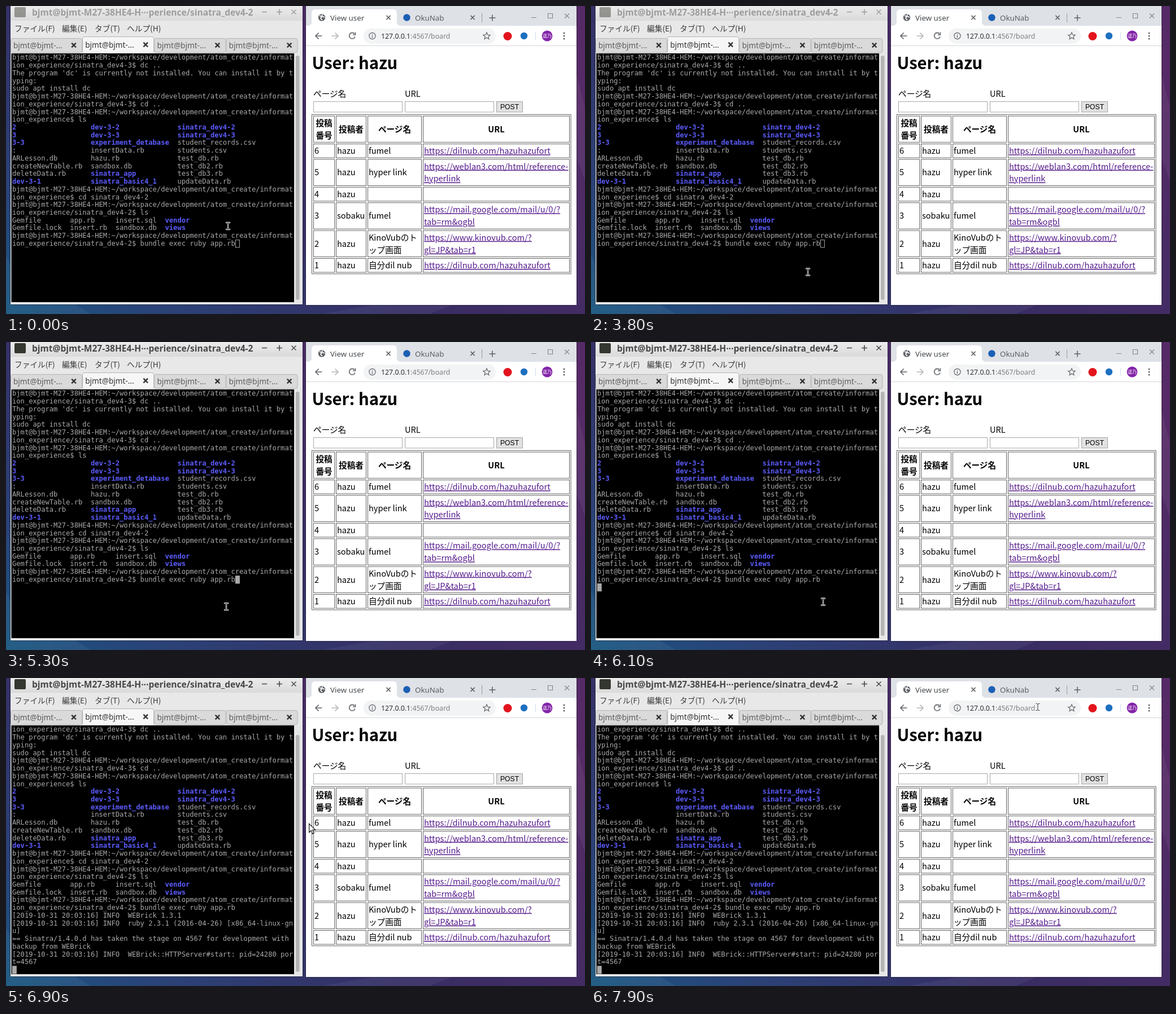
These frames come from a looping animation (1025 by 546 pixels, 8 s). An HTML page:

```html
<!DOCTYPE html>
<html lang="ja">
<head>
<meta charset="utf-8">
<title>Terminal and browser</title>
<style>
html, body { margin: 0; width: 100%; height: 100%; overflow: hidden; background: #343163; }
svg { display: block; width: 1025px; height: 546px; }
text { white-space: pre; }
.ui { font-family: "Noto Sans", "Open Sans", sans-serif; }
.ja { font-family: "Noto Sans CJK JP", "Noto Sans CJK", sans-serif; }
.page { font-size: 14.63px; }
.mono { font: 12.15px "DejaVu Sans Mono", monospace; fill: #aaa; }
.dir { font-weight: bold; fill: #5c5cff; }
.bold { font-weight: bold; }
.mid { text-anchor: middle; }
.link { fill: #551a8b; text-decoration: underline; }
.line { fill: none; stroke-width: 1.6; }
</style>
</head>
<body>
<svg id="stage" viewBox="0 0 1025 546">
  <defs>
    <linearGradient id="wall" x1="0" y1="1" x2="1" y2=".35">
      <stop offset="0" stop-color="#17567f"/><stop offset=".18" stop-color="#2a4378"/>
      <stop offset=".5" stop-color="#372d63"/><stop offset="1" stop-color="#552a66"/>
    </linearGradient>
    <linearGradient id="bar" x2="0" y2="1">
      <stop offset="0" stop-color="#ebebeb"/><stop offset="1" stop-color="#dadada"/>
    </linearGradient>
  </defs>
  <rect width="1025" height="546" fill="url(#wall)"/>
  <path d="M0 440L8 460 150 546H0zM560 546l90-16h140l-40 16zM1010 120l15 60v130l-15-40z" fill="#fff" opacity=".05"/>
  <g id="terminal"></g>
  <g id="browser"></g>
  <g id="pointer">
    <g id="beam" fill="none" stroke-linecap="round">
      <path d="M-3-6H-1L0-5 1-6H3M0-5V5M-3 6H-1L0 5 1 6H3" stroke="#fff" stroke-width="2.5"/>
      <path d="M-3-6H-1L0-5 1-6H3M0-5V5M-3 6H-1L0 5 1 6H3" stroke="#111" stroke-width=".9"/>
    </g>
    <path id="arrow" d="M0 0V15.2L3.5 12 6 17.8 8.6 16.6 6.1 11H11z" fill="#fff" stroke="#111" stroke-width="1.2"/>
  </g>
</svg>
<script>
const $ = id => document.getElementById(id);
const text = (x, y, s, cls, more = '') => `<text x="${x}" y="${y}" class="${cls}" ${more}>${s}</text>`;
const rect = (x, y, w, h, fill, more = '') =>
  `<rect x="${x}" y="${y}" width="${w}" height="${h}" fill="${fill}" ${more}/>`;
const line = (d, color, more = '') => `<path class="line" d="${d}" stroke="${color}" ${more}/>`;
const cross = (x, y, r, color, w = 1.5) =>
  line(`M${x - r} ${y - r}l${2 * r} ${2 * r}m0 ${-2 * r}l${-2 * r} ${2 * r}`, color, `style="stroke-width:${w}"`);
const dot = (x, y, r, fill) => `<circle cx="${x}" cy="${y}" r="${r}" fill="${fill}"/>`;

// Terminal
const COL = 7.315, ROW = 13.73, LEFT = 11, TOP = 85;
const prompt = 'bjmt@bjmt-M27-38HE4-HEM:~/workspace/development/atom_create/informat';
const home = 'ion_experience';
const stamp = '[2019-10-31 20:03:16] INFO  ';
// Cells marked * are directories
const columns = (stops, ...cells) => {
  let out = '', used = 0;
  cells.forEach((cell, i) => {
    const name = cell.replace('*', '');
    out += ' '.repeat(stops[i] - used) + (name === cell ? name : `<tspan class="dir">${name}</tspan>`);
    used = stops[i] + name.length;
  });
  return out;
};
const wide = (...cells) => columns([0, 19, 40], ...cells);
const short = (...cells) => columns([0, 14, 25, 37], ...cells);
const rows = [
  prompt, home + '/sinatra_dev4-3$ dc ..',
  "The program 'dc' is currently not installed. You can install it by t", 'yping:',
  'sudo apt install dc',
  prompt, home + '/sinatra_dev4-3$ cd ..',
  prompt, home + '$ ls',
  wide('*2', '*dev-3-2', '*sinatra_dev4-2'),
  wide('*3', '*dev-3-3', '*sinatra_dev4-3'),
  wide('*3-3', '*experiment_detabase', 'student_records.csv'),
  wide(':', 'insertData.rb', 'students.csv'),
  wide('ARLesson.db', 'hazu.rb', 'test_db.rb'),
  wide('createNewTable.rb', 'sandbox.db', 'test_db2.rb'),
  wide('deleteData.rb', '*sinatra_app', 'test_db3.rb'),
  wide('*dev-3-1', '*sinatra_basic4_1', 'updateData.rb'),
  prompt, home + '$ cd sinatra_dev4-2',
  prompt, home + '/sinatra_dev4-2$ ls',
  short('Gemfile', 'app.rb', 'insert.sql', '*vendor'),
  short('Gemfile.lock', 'insert.rb', 'sandbox.db', '*views'),
  prompt, home + '/sinatra_dev4-2$ bundle exec ruby app.rb',
  stamp + 'WEBrick 1.3.1',
  stamp + 'ruby 2.3.1 (2016-04-26) [x86_64-linux-gn', 'u]',
  '== Sinatra/1.4.0.d has taken the stage on 4567 for development with', 'backup from WEBrick',
  stamp + 'WEBrick::HTTPServer#start: pid=24280 por', 't=4567'
];
const printRows = (from, to) => rows.slice(from, to)
  .map((s, i) => text(LEFT, (TOP + 10.4 + (from + i) * ROW).toFixed(2), s, 'mono')).join('');

const tab = i => {
  const x = 8 + i * 127.2, on = i === 1;
  return rect(x + .5, on ? 54.5 : 57.5, 126, on ? 30 : 25, on ? '#f6f6f6' : '#dadada', 'rx="3" stroke="#b4b4b4"') +
    text(x + 5, on ? 73.5 : 74.5, 'bjmt@bjmt-...', 'ui', `font-size="13.6" fill="${on ? '#333' : '#5c5c5c'}"`) +
    cross(x + 112, on ? 68.5 : 69.5, 3.8, '#333', 2.4);
};
$('terminal').innerHTML =
  rect(7, -5, 519, 535, '#000', 'rx="3" opacity=".3"') +
  rect(8, 0, 517, 529, '#e8e8e8') + rect(8, 0, 517, 26, 'url(#bar)') +
  `<g id="title">${rect(15, 2, 20, 18, '#34372f', 'rx="2"')}
  ${text(46, 17, 'bjmt@bjmt-M27-38HE4-H···perience/sinatra_dev4-2', 'ui bold', 'font-size="15.5" fill="#484848"')}
  ${line('M453 10.5h9M479 10.5h10m-5-5v10', '#484848')}${cross(509.5, 10.5, 4, '#484848')}</g>` +
  [[15, 'ファイル(F)'], [99, '編集(E)'], [157, 'タブ(T)'], [214, 'ヘルプ(H)']]
    .map(([x, s]) => text(x, 45, s, 'ja', 'font-size="13.7" fill="#3c3c3c"')).join('') +
  [0, 2, 3, 1].map(tab).join('') +
  rect(8, 83, 517, 446, '#e6e6e6') + rect(9.5, 84, 500.5, 441, '#000') +
  `<rect id="thumb" x="513" width="6.5" rx="3.2" fill="#b4b4b4"/>
  <g id="lines">${printRows(0, 1)}<g>${printRows(1, 25)}</g><g id="log">${printRows(25, 32)}</g></g>
  <rect id="caret" width="7" height="13.2" stroke="#aaa"/>`;
const firstRow = $('lines').firstElementChild;

// Browser
const grey = '#5f6368';
const cellX = [544, 584, 640, 738], cellW = [38.2, 54, 96, 260];
const records = [
  ['6', 'hazu', 'fumel', 'https://dilnub.com/hazuhazufort'],
  ['5', 'hazu', 'hyper link', 'https://weblan3.com/html/reference-|hyperlink'],
  ['4', 'hazu', '', ''],
  ['3', 'sobaku', 'fumel', 'https://mail.google.com/mail/u/0/?|tab=rm&amp;ogbl'],
  ['2', 'hazu', 'KinoVubのト|ップ画面', 'https://www.kinovub.com/?|gl=JP&amp;tab=r1'],
  ['1', 'hazu', '自分dil nub', 'https://dilnub.com/hazuhazufort']
];
function table() {
  const edge = 'stroke="#5a5a5a" stroke-width=".95"';
  let y = 194.6, out = '';
  [['投稿|番号', '投稿者', 'ページ名', 'URL'], ...records].forEach((cells, r) => {
    const h = cells.some(s => s.includes('|')) ? 47.55 : 25.6;
    cells.forEach((s, c) => {
      const x = cellX[c], w = cellW[c], parts = s.split('|');
      out += rect(x + .5, y + .5, w - 1, h - 1, 'none', edge);
      parts.forEach((p, i) => {
        const base = y + h / 2 + 5.3 + (i - (parts.length - 1) / 2) * 21.95;
        out += r ? text(x + 1.9, base, p, 'ja page' + (c === 3 ? ' link' : ''))
          : text(x + w / 2, base, p, 'ja page bold mid');
      });
    });
    y += h + 1.83;
  });
  return rect(541.5, 192.3, 458.5, y - 191.9, 'none', edge) + out;
}
const input = x => rect(x + .5, 169.5, 157, 18.5, '#fff', 'stroke="#a8a8a8"');
$('browser').innerHTML =
  rect(530, -5, 481, 536, '#000', 'rx="3" opacity=".3"') +
  rect(531, 0, 479, 530, '#fff') + rect(531, 0, 479, 35, '#dee1e6') +
  '<path d="M534 35q7 0 7-7V13q0-7 7-7H685q7 0 7 7V28q0 7 7 7z" fill="#fff"/>' +
  dot(559, 20.5, 6.2, grey) +
  line('M555 17l4 2-2 3 3 3M560 15l-1 3 5 2', '#fff') +
  text(574, 25.5, 'View user', 'ui', 'font-size="13.3" fill="#45494d"') + cross(677, 20.5, 3.6, grey) +
  dot(709.5, 20.5, 6.2, '#1b5fb4') +
  text(724, 25.5, 'OkuNab', 'ui', 'font-size="13.3" fill="#5a5e63"') + cross(826, 20.5, 3.6, grey) +
  line('M842.5 13v16', '#9a9da1', 'style="stroke-width:1"') + line('M855.5 21h11m-5.5-5.5v11', grey) +
  line('M930 20.5h9M959.5 13.5h8v8h-8z', '#85888c', 'style="stroke-width:1.2"') + cross(993, 17.5, 4, '#85888c', 1.2) +
  line('M559.5 53H548m5.5-5.5L548 53l5.5 5.5', grey) +
  line('M576.5 53H588m-5.5-5.5L588 53l-5.5 5.5', '#b4b6b9') +
  line('M617 49.3a5.3 5.3 0 1 0 1 5M618.5 46.5v4.5h-4.5', grey) +
  rect(633, 40, 234, 26.5, '#f1f3f4', 'rx="13.2"') +
  `<circle class="line" cx="648.5" cy="53" r="5.6" stroke="${grey}" style="stroke-width:1.2"/>` +
  line('M648.5 52v4.2M648.5 49.6v1.3', grey, 'style="stroke-width:1.3"') +
  text(664, 57.5, '127.0.0.1<tspan fill="#7b7f84">:4567/board</tspan>', 'ui', 'font-size="12.3" fill="#2a2d31"') +
  line('M851 47l1.8 4 4.4.4-3.3 2.9 1 4.3-3.9-2.3-3.9 2.3 1-4.3-3.3-2.9 4.4-.4z', grey, 'style="stroke-width:1.2"') +
  dot(888, 53.5, 7.5, '#e2141c') + dot(917, 53, 6.2, '#1d6fc0') +
  line('M937.5 46v14', '#cfdcec', 'style="stroke-width:1"') +
  dot(958, 53, 9.4, '#8424a8') + text(958, 56.3, '遥乃', 'ja mid', 'font-size="8" fill="#fff"') +
  [48, 53, 58].map(y => dot(988, y, 1.5, grey)).join('') +
  rect(531, 70, 479, 1, '#d4d6d9') +
  text(541.5, 112, 'User: hazu', 'ja bold', 'font-size="29.26"') +
  text(544, 160.6, 'ページ名', 'ja page') + text(706, 160.6, 'URL', 'ja page') + input(544) + input(706) +
  rect(868.5, 169.5, 46, 18.5, '#e2e2e2', 'stroke="#a2a2a2"') +
  text(891.5, 183, 'POST', 'mid', 'font-family="Liberation Sans, Arial, sans-serif" font-size="12.19"') +
  table();

// Pointer path: time, x, y
const path = [
  [900, 393, 390], [1000, 418, 379], [1100, 452, 376], [1200, 486, 385], [1300, 494, 412],
  [1400, 474, 450], [1500, 430, 482], [1600, 392, 494], [1700, 373, 495], [3700, 373, 495],
  [3800, 384, 471.5], [5000, 384, 471.5], [5300, 390, 469], [5800, 390, 469], [6100, 411, 460.5],
  [6400, 411, 460.5], [6700, 470, 365], [7000, 570, 205], [7300, 645, 98.5], [7400, 677, 73],
  [7500, 745, 58], [7600, 810, 52], [7700, 841, 51], [7800, 820, 51], [7900, 791, 51.5]
];
function pointerAt(t) {
  const i = path.findIndex(k => k[0] >= t);
  if (i < 0) return path[path.length - 1].slice(1);
  if (!i) return path[0].slice(1);
  const [a, b] = [path[i - 1], path[i]], f = (t - a[0]) / (b[0] - a[0]);
  return [1, 2].map(n => a[n] + (b[n] - a[n]) * f);
}
const overText = (x, y) => x < 510 ||
  (y > 40 && y < 66 && x > 660 && x < 838) || (y > 88 && y < 118 && x > 541 && x < 694);
const show = (el, on) => el.setAttribute('visibility', on ? 'visible' : 'hidden');

function draw(now) {
  const t = Math.floor(now % 8000 / 100) * 100;
  const focused = t >= 5100, entered = t >= 5600, running = t >= 6200;
  $('title').setAttribute('opacity', focused ? 1 : .45);
  $('lines').setAttribute('transform', `translate(0 ${running ? -ROW : 0})`);
  show(firstRow, !running);
  show($('log'), running);
  $('thumb').setAttribute('y', running ? 101 : 88);
  $('thumb').setAttribute('height', running ? 420 : 433);
  const row = running ? 31 : entered ? 25 : 24;
  $('caret').setAttribute('x', LEFT + (entered ? 0 : 54 * COL) + .3);
  $('caret').setAttribute('y', TOP + row * ROW + .2);
  $('caret').setAttribute('fill', focused ? '#aaa' : 'none');
  const [x, y] = pointerAt(t), beam = overText(x, y);
  $('pointer').setAttribute('transform', `translate(${x} ${y})`);
  show($('beam'), beam);
  show($('arrow'), !beam);
}
const start = performance.now();
(function tick() {
  draw(performance.now() - start);
  requestAnimationFrame(tick);
})();
</script>
</body>
</html>
```
